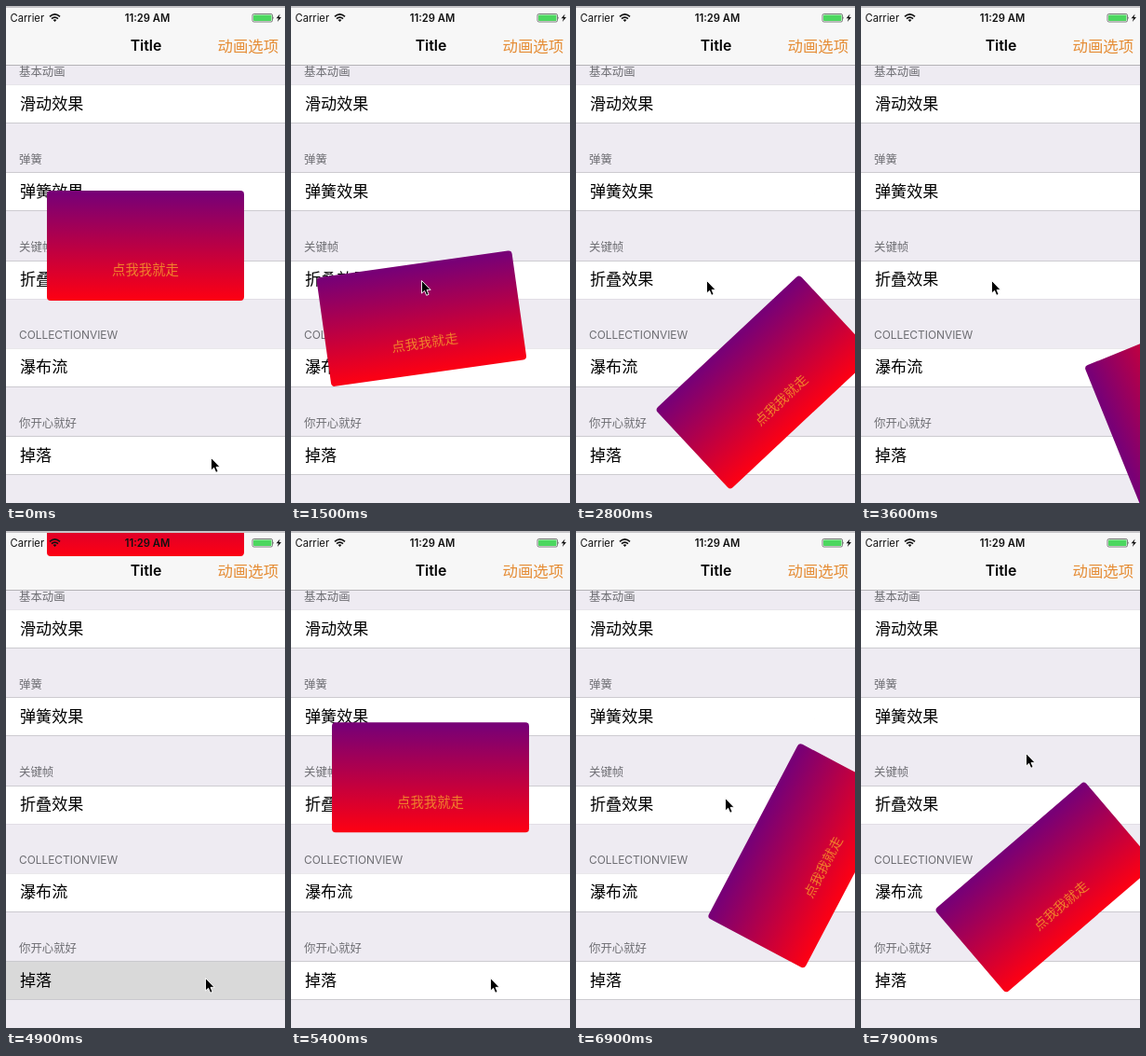
An HTML page for the animation above (8 s loop, 300 px wide and 533 px high).

```html
<!DOCTYPE html>
<html lang="zh-CN">
<head>
<meta charset="utf-8">
<title>Title</title>
<style>
html, body { margin: 0; width: 100%; height: 100%; overflow: hidden; background: #eeebf2; }
svg { display: block; width: 100%; height: 100%; }
text { font-family: Inter, "Noto Sans CJK SC", "Noto Sans CJK", sans-serif; }
.cjk { font-family: "Noto Sans CJK SC", "Noto Sans CJK", sans-serif; }
.head { font-size: 12.4px; fill: #6d6d72; }
.latin { font-family: Inter, sans-serif; font-size: 11.9px; }
.row { font-size: 17.1px; fill: #000; }
.bar { font-size: 11.2px; fill: #111; }
</style>
</head>
<body>
<svg viewBox="0 0 300 533" preserveAspectRatio="none">
  <defs>
    <linearGradient id="fill" x1="0" y1="0" x2="0" y2="1">
      <stop offset="0.03" stop-color="#780076"/>
      <stop offset="0.97" stop-color="#fa0015"/>
    </linearGradient>
  </defs>
  <rect width="300" height="533" fill="#eeebf2"/>
  <g id="list"></g>
  <rect width="300" height="63.5" fill="#f7f7f7"/>
  <rect y="63" width="300" height="1" fill="#b4b3b7"/>
  <text x="150.5" y="48.3" text-anchor="middle" font-size="15.8" font-weight="600">Title</text>
  <text class="cjk" x="227.5" y="48.6" font-size="16.4" fill="#e58c34">动画选项</text>

  <g id="card">
    <rect x="-212" width="212" height="118" rx="4" fill="url(#fill)"/>
    <text id="label" class="cjk" x="-106" y="90.4" text-anchor="middle" font-size="14.4" font-weight="300" fill="#f0802c">点我我就走</text>
  </g>

  <text class="bar" x="4.5" y="16.5">Carrier</text>
  <g fill="none" stroke="#111" stroke-width="1.7">
    <path d="M47 11.3Q52.5 6.5 58 11.3"/>
    <path d="M49 13.6Q52.5 10.6 56 13.6"/>
  </g>
  <path d="M50.6 15.1Q52.5 13.6 54.4 15.1L52.5 17Z" fill="#111"/>
  <text class="bar" x="152" y="16.5" text-anchor="middle" font-weight="600">11:29 AM</text>
  <rect x="265" y="8.5" width="21.5" height="8.5" rx="1.6" fill="#fff" stroke="#444" stroke-width="0.7"/>
  <rect x="266" y="9.5" width="19.5" height="6.5" rx="0.8" fill="#4cd75f"/>
  <path d="M287.3 11.2q1.3 1.5 0 3z" fill="#444"/>
  <path d="M294.6 8.6L290.6 13.3H293L291.8 17L296 12.1H293.5Z" fill="#111"/>
  <rect width="300" height="2" fill="#c6c5c8"/>

  <path id="cursor" d="M0 0V13.6L3.1 10.8L5.2 15.8L7.6 14.8L5.5 9.9H9.6Z" fill="#000" stroke="#fff" stroke-width="0.9" stroke-linejoin="round"/>
</svg>
<script>
const LOOP = 8000, REST = 211;
const $ = id => document.getElementById(id);

const rows = [
  ['基本动画', '滑动效果'],
  ['弹簧', '弹簧效果'],
  ['关键帧', '折叠效果'],
  ['COLLECTIONVIEW', '瀑布流'],
  ['你开心就好', '掉落']
];

$('list').innerHTML = rows.map(([head, name], i) => {
  const top = 84.5 + 94.25 * i;
  const kind = /[A-Z]/.test(head) ? 'latin' : 'cjk';
  return `<text class="head ${kind}" x="14" y="${top - 9.9}">${head}</text>
    <rect ${i === 4 ? 'id="cell"' : ''} y="${top}" width="300" height="41" fill="#fff"/>
    <rect y="${Math.floor(top)}" width="300" height="1" fill="#c8c7cc" opacity="${i % 3 ? 0.9 : 0.35}"/>
    <rect y="${Math.floor(top + 41)}" width="300" height="1" fill="#c8c7cc" opacity="${i === 2 ? 0.35 : 0.9}"/>
    <text class="cjk row" x="15" y="${top + 26.2}">${name}</text>`;
}).join('');

// Swing after a tap: ms, hinge corner x, y, degrees
const swing = [
  [0, 256, REST, 0],
  [100, 238, 217, -0.5],
  [200, 220, 236, -2.5],
  [300, 237, 262, -7.8],
  [390, 242, 239, -40],
  [490, 240, 227, -62],
  [650, 240, 230, -88],
  [800, 240, 238, -98],
  [1000, 240, 238, -86],
  [1200, 240, 227, -58],
  [1350, 240, 238, -44],
  [1490, 240, 268, -40.6],
  [1600, 240, 288, -43],
  [1900, 240, 291, -66],
  [2000, 240, 295, -76]
];

// Pointer stops: ms, x, y
const stops = [
  [0, 220.5, 484.5], [500, 220.5, 484.5], [1050, 140.5, 294.5], [4200, 140.5, 294.5],
  [4680, 214.5, 479.5], [5450, 214.5, 479.5], [6250, 159.5, 281.5], [6500, 159.5, 281.5],
  [6800, 160.5, 286.5], [7100, 160.5, 286.5], [7800, 177.5, 238.5], [8000, 177.5, 238.5]
];

const clamp = v => Math.max(0, Math.min(1, v));
const smooth = v => v * v * (3 - 2 * v);

function segment(keys, t) {
  let i = 0;
  while (i < keys.length - 2 && t >= keys[i + 1][0]) i++;
  return i;
}

function slope(keys, i, c) {
  if (i === 0) return 0;
  const a = keys[i - 1], b = keys[Math.min(i + 1, keys.length - 1)];
  return (b[c] - a[c]) / (b[0] - a[0]);
}

function hermite(keys, t, c) {
  const i = segment(keys, t), a = keys[i], b = keys[i + 1];
  const d = b[0] - a[0], u = clamp((t - a[0]) / d), v = 1 - u;
  return v * v * (1 + 2 * u) * a[c] + u * u * (3 - 2 * u) * b[c]
    + d * u * v * (v * slope(keys, i, c) - u * slope(keys, i + 1, c));
}

function swingPose(t) {
  const [x, y, r] = [1, 2, 3].map(c => hermite(swing, t, c));
  const s = Math.max(0, t - 2000) / 1000;
  return [x, y + 40 * s + 470 * s * s, r - 90 * s];
}

// Critically damped drop from above the screen
function dropPose(t) {
  const u = 0.011 * t;
  return [256, REST - 329 * (1 + u) * Math.exp(-u), 0];
}

function cardPose(t) {
  if (t < 1200) return dropPose(t + 455);
  if (t < 3920) return swingPose(t - 1200);
  if (t < 4858) return [256, -130, 0];
  if (t < 6410) return dropPose(t - 4858);
  return swingPose(t - 6410);
}

function pointer(t) {
  const i = segment(stops, t), a = stops[i], b = stops[i + 1];
  const u = smooth(clamp((t - a[0]) / (b[0] - a[0])));
  return [1, 2].map(c => a[c] + (b[c] - a[c]) * u);
}

function draw(t) {
  const [x, y, r] = cardPose(t);
  $('card').setAttribute('transform', `translate(${x} ${y}) rotate(${r})`);

  const pressed = (t > 1120 && t < 1200) || (t > 6330 && t < 6410);
  $('label').setAttribute('opacity', pressed ? 0.35 : 1);

  const lit = t < 4750 ? 0 : 1 - clamp((t - 5050) / 150);
  const grey = Math.round(255 - 38 * lit);
  $('cell').setAttribute('fill', `rgb(${grey},${grey},${grey})`);

  $('cursor').setAttribute('transform', `translate(${pointer(t)})`);
}

const start = performance.now();
function tick(now) {
  draw(Math.max(0, now - start) % LOOP);
  requestAnimationFrame(tick);
}
draw(0);
requestAnimationFrame(tick);
</script>
</body>
</html>
```
